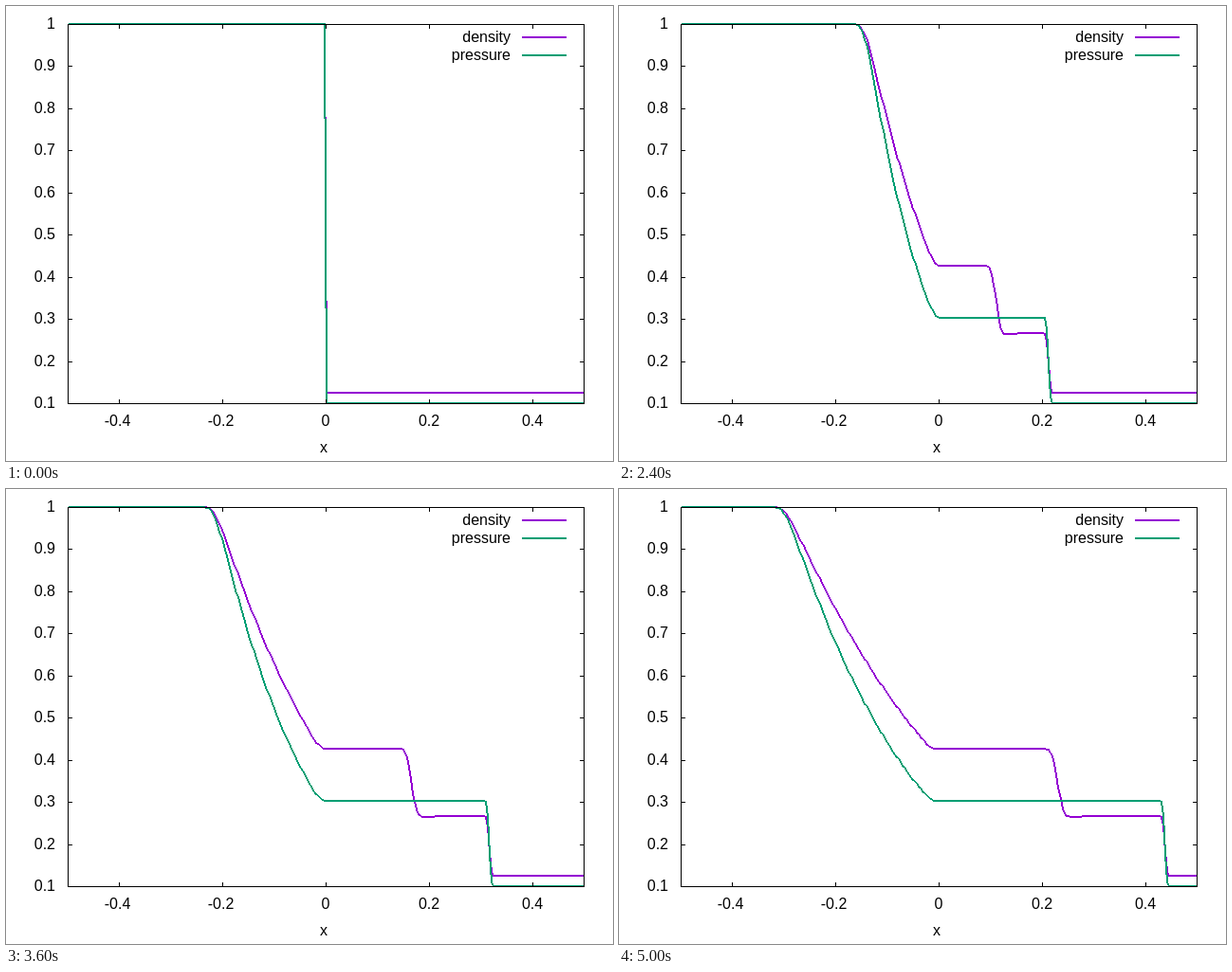
An HTML page with a canvas that plays this animation: 640 by 480 pixels, repeating every 5200 ms.

```html
<!DOCTYPE html>
<html lang="en">
<head>
<meta charset="utf-8">
<title>Shock tube</title>
<style>
  html, body { margin: 0; width: 100%; height: 100%; overflow: hidden; background: #fff; }
  canvas { display: block; }
</style>
</head>
<body>
<canvas id="stage" width="640" height="480"></canvas>
<script>
const GAMMA = 1.4, CELLS = 256, DX = 1 / CELLS, CFL = 0.8;
const END_TIME = 0.25, OUTPUT_STEP = 0.01, FRAME_MS = 200, FRAME_COUNT = 26;

// --- Gas dynamics: states are [density, velocity, pressure] ---

const soundSpeed = ([d, , p]) => Math.sqrt(GAMMA * p / d);
const energy = ([d, u, p]) => p / (GAMMA - 1) + 0.5 * d * u * u;
const toConserved = w => [w[0], w[0] * w[1], energy(w)];
const toPrimitive = ([d, m, e]) => [d, m / d, (GAMMA - 1) * (e - 0.5 * m * m / d)];

// HLLC flux between a left and a right state.
function hllc(left, right) {
  const [dl, ul, pl] = left, [dr, ur, pr] = right;
  const cl = soundSpeed(left), cr = soundSpeed(right);
  const pMid = 0.5 * (pl + pr + (ul - ur) * 0.25 * (dl + dr) * (cl + cr));
  const boost = p => pMid <= p ? 1 : Math.sqrt(1 + (GAMMA + 1) / (2 * GAMMA) * (pMid / p - 1));
  const al = ul - cl * boost(pl), ar = ur + cr * boost(pr);
  const bm = Math.min(al, -1e-20), bp = Math.max(ar, 1e-20);

  const tl = pl + (ul - al) * dl * ul, tr = pr + (ur - ar) * dr * ur;
  const ml = dl * (ul - al), mr = -dr * (ur - ar);
  const am = (tl - tr) / (ml + mr);
  const cp = Math.max(0, (ml * tr + mr * tl) / (ml + mr));

  const sideFlux = (w, b) => {
    const v = w[1] - b;
    return [w[0] * v, w[0] * w[1] * v + w[2], energy(w) * v + w[2] * w[1]];
  };
  const [side, b] = am >= 0 ? [left, bm] : [right, bp];
  const f = sideFlux(side, b), weight = am / (am - b), star = -b / (am - b) * cp;
  return [weight * f[0], weight * f[1] + star, weight * f[2] + star * am];
}

// Van Leer limited half-cell slopes.
function halfSlope(a, b, c) {
  return b.map((mid, k) => {
    const l = mid - a[k], r = c[k] - mid;
    return l * r > 0 ? l * r / (l + r) : 0;
  });
}

function advance(base, states, dt, secondOrder) {
  const at = i => states[Math.max(0, Math.min(CELLS - 1, i))];
  const edge = (i, sign) => {
    if (!secondOrder) return at(i);
    const slope = halfSlope(at(i - 1), at(i), at(i + 1));
    return at(i).map((v, k) => v + sign * slope[k]);
  };
  const flux = Array.from({ length: CELLS + 1 }, (_, i) => hllc(edge(i - 1, 1), edge(i, -1)));
  return base.map((w, i) => toPrimitive(
    toConserved(w).map((q, k) => q - dt / DX * (flux[i + 1][k] - flux[i][k]))));
}

function simulate() {
  let gas = Array.from({ length: CELLS }, (_, i) => i < CELLS / 2 ? [1, 0, 1] : [0.125, 0, 0.1]);
  const frames = [gas];
  let time = 0, nextOutput = OUTPUT_STEP;
  while (time < END_TIME) {
    const fastest = Math.max(...gas.map(w => Math.abs(w[1]) + soundSpeed(w)));
    const dt = Math.min(CFL * DX / fastest, END_TIME - time);
    const half = advance(gas, gas, dt / 2, false);
    gas = advance(gas, half, dt, true);
    time = dt === END_TIME - time ? END_TIME : time + dt;
    if (time >= nextOutput && time < END_TIME) {
      frames.push(gas);
      nextOutput += OUTPUT_STEP;
    }
  }
  frames[FRAME_COUNT - 1] = gas;
  return frames;
}

// --- Plot ---

const ctx = document.getElementById("stage").getContext("2d");
const LEFT = 65, RIGHT = 609, TOP = 19, BOTTOM = 419, TICK = 5;
const mapX = x => LEFT + Math.floor((x + 0.5) * (RIGHT - LEFT) + 0.5);
const mapY = v => BOTTOM - Math.floor((v - 0.1) / 0.9 * (BOTTOM - TOP) + 0.5);
const series = [
  { name: "density", color: "#9400d3", index: 0, keyY: 33 },
  { name: "pressure", color: "#009e73", index: 2, keyY: 52 },
];

// Two pixels wide Bresenham line without antialiasing.
function thickLine(x1, y1, x2, y2) {
  const steep = Math.abs(y2 - y1) > Math.abs(x2 - x1);
  let [a, b, aEnd, bEnd] = steep ? [y1, x1, y2, x2] : [x1, y1, x2, y2];
  if (a > aEnd) [a, b, aEnd, bEnd] = [aEnd, bEnd, a, b];
  const da = aEnd - a, db = Math.abs(bEnd - b), step = Math.sign(bEnd - b);
  for (let d = 2 * db - da; a <= aEnd; a++) {
    if (steep) ctx.fillRect(b - 1, a, 2, 1);
    else ctx.fillRect(a, b - 1, 1, 2);
    if (d >= 0) { b += step; d -= 2 * da; }
    d += 2 * db;
  }
}

function label(text, x, y, align) {
  ctx.textAlign = align;
  ctx.fillText(text, x, y);
}

function drawAxes() {
  ctx.fillStyle = "#000";
  for (const y of [TOP, BOTTOM]) ctx.fillRect(LEFT, y, RIGHT - LEFT + 1, 1);
  for (const x of [LEFT, RIGHT]) ctx.fillRect(x, TOP, 1, BOTTOM - TOP + 1);
  for (let n = 1; n <= 10; n++) {
    const y = mapY(n / 10);
    ctx.fillRect(LEFT, y, TICK, 1);
    ctx.fillRect(RIGHT - TICK + 1, y, TICK, 1);
    label(String(n / 10), 52, y + 5, "right");
  }
  for (let n = -2; n <= 2; n++) {
    const x = mapX(n / 5);
    ctx.fillRect(x, TOP, 1, TICK);
    ctx.fillRect(x, BOTTOM - TICK + 1, 1, TICK);
    label(String(n / 5), n < 0 ? x - 1.5 : x, 443, "center");
  }
  label("x", 335, 471, "center");
}

function drawFrame(gas) {
  ctx.fillStyle = "#fff";
  ctx.fillRect(0, 0, 640, 480);
  ctx.font = '16px "Liberation Sans", Arial, sans-serif';
  for (const { name, color, index, keyY } of series) {
    ctx.fillStyle = "#000";
    label(name, 532, keyY + 5, "right");
    ctx.fillStyle = color;
    thickLine(544, keyY, 590, keyY);
    const points = gas.map((w, i) => [mapX((i + 0.5) * DX - 0.5), mapY(w[index])]);
    for (let i = 1; i < CELLS; i++) thickLine(...points[i - 1], ...points[i]);
  }
  drawAxes();
}

const frames = simulate();
const start = performance.now();
let shown = -1;

function tick() {
  const current = Math.floor((performance.now() - start) / FRAME_MS) % FRAME_COUNT;
  if (current !== shown) drawFrame(frames[shown = current]);
  requestAnimationFrame(tick);
}
tick();
</script>
</body>
</html>
```
